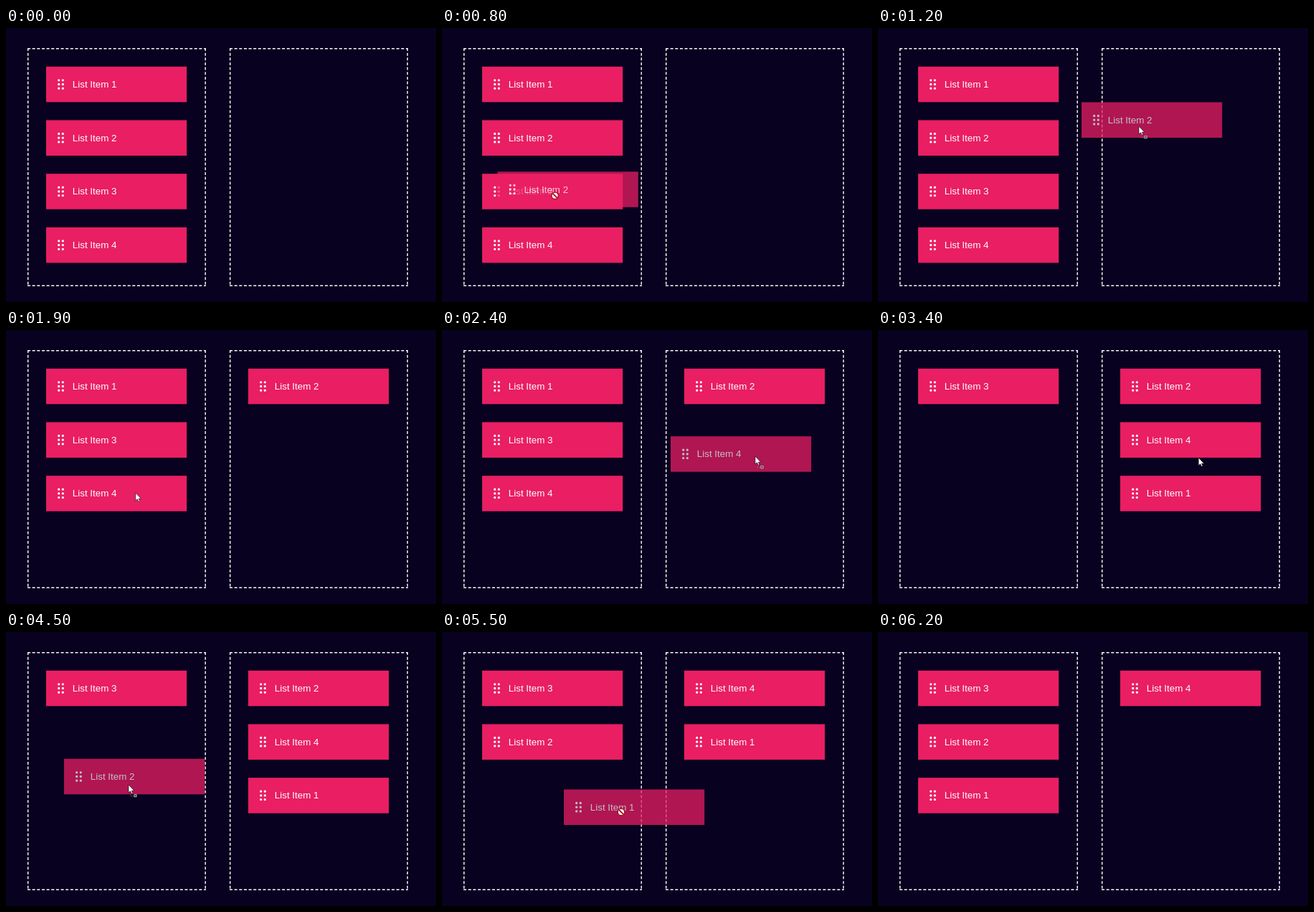
Recreate the animation shown at these times as an HTML page. Size 600 by 382 pixels, loop 6.3 s.

```html
<!DOCTYPE html>
<html lang="en">
<head>
<meta charset="utf-8">
<title>Drag and drop lists</title>
<style>
  html, body { margin: 0; width: 100%; height: 100%; overflow: hidden; background: #080120; }
  svg { display: block; width: 600px; height: 382px; }
  text { font: 13.4px "Liberation Sans", Arial, sans-serif; fill: #fff; }
  .list { fill: none; stroke: #fff; stroke-width: 1.4; stroke-dasharray: 4 2.65; }
</style>
</head>
<body>
<svg viewBox="0 0 600 382">
  <defs>
    <g id="card">
      <rect width="196.2" height="49.5" fill="#e91e63"/>
      <path d="M17.7 19h0M23.3 19h0M17.7 24.7h0M23.3 24.7h0M17.7 30.4h0M23.3 30.4h0"
            stroke="#fff" stroke-width="3.3" stroke-linecap="round"/>
    </g>
    <path id="arrow" d="M0 0V11L2.5 8.8 4.3 12.4 6 11.6 4.3 8.2H7.8Z" fill="#fff" stroke="#000" stroke-width=".6"/>
    <g id="move">
      <use href="#arrow"/>
      <path d="M3 13v3h4" fill="none" stroke="#888" stroke-width=".8" stroke-dasharray="1 1"/>
      <rect x="8" y="13.7" width="3" height="3" fill="#222" stroke="#bbb"/>
    </g>
    <g id="blocked">
      <circle r="4.8" fill="#fff" stroke="#a01828" stroke-width="1.6"/>
      <path d="M-3-3 3 3" stroke="#c01828" stroke-width="2"/>
    </g>
    <path id="frame" class="list" d="M30 28.7h249M30 359.2h249M30.7 28v332M278.2 28v332"/>
  </defs>
  <use href="#frame"/>
  <use href="#frame" x="282"/>
  <g id="scene"></g>
</svg>
<script>
const STEP = 100, STEPS = 63;
const scene = document.getElementById('scene');
const key = (step, x, y) => ({ step, x, y });
const slot = (list, row) => ({ x: 56 + 282 * list, y: 53.8 + 74.7 * row });

// Each drag picks an item up, passes the via points and lands in a free slot
const enter = key(1, 241, 78), leave = key(62, 230, 76);
const drags = [
  { item: 2, to: 1, grab: key(4, 136, 162), via: [key(7, 106, 258), key(12, 364, 137)], drop: 14 },
  { item: 4, to: 1, grab: key(20, 174, 231), via: [key(24, 437, 176)], drop: 26 },
  { item: 1, to: 1, grab: key(27, 176, 78), via: [key(30, 430, 250)], drop: 32 },
  { item: 2, to: 0, grab: key(42, 428, 90), via: [key(45, 171, 213)], drop: 47 },
  { item: 1, to: 0, grab: key(53, 418, 160), via: [key(55, 250, 251), key(56, 170, 268)], drop: 58 }
];

let lists = [[1, 2, 3, 4], []];
const path = [enter];
for (const drag of drags) {
  const { item, to, grab, via, drop } = drag;
  const home = slot(1 - to, lists[1 - to].indexOf(item));
  const end = slot(to, lists[to].length);
  drag.before = lists;
  drag.offset = { x: home.x - grab.x, y: home.y - grab.y };
  path.push({ ...grab, free: true }, ...via,
    key(drop, end.x - drag.offset.x, end.y - drag.offset.y));
  lists = lists.map((items, i) =>
    i === to ? [...items, item] : items.filter(other => other !== item));
}
path.push({ ...leave, free: true });

// The free pointer slows down as it arrives; a dragging one moves evenly
function pointer(step) {
  if (step < enter.step || step >= leave.step) return null;
  const i = path.findIndex(point => point.step > step);
  const a = path[i - 1], b = path[i];
  const t = (step - a.step) / (b.step - a.step);
  const k = b.free ? 1 - (1 - t) ** 2 : t;
  return { x: a.x + (b.x - a.x) * k, y: a.y + (b.y - a.y) * k };
}

const card = (item, { x, y }, opacity = 1) =>
  `<g transform="translate(${x} ${y})" opacity="${opacity}">
    <use href="#card"/><text x="36.8" y="29.3">List Item ${item}</text></g>`;

function render(step) {
  const next = drags.find(drag => step < drag.drop);
  let html = (next ? next.before : lists).map((items, list) =>
    items.map((item, row) => card(item, slot(list, row))).join('')).join('');

  const at = pointer(step);
  let shape = 'arrow';
  if (next && step > next.grab.step) {
    html += card(next.item, { x: at.x + next.offset.x, y: at.y + next.offset.y }, 0.75);
    shape = (next.to ? at.x > 312 : at.x < 240) ? 'move' : 'blocked';
  }
  if (at) html += `<use href="#${shape}" x="${at.x}" y="${at.y}"/>`;
  scene.innerHTML = html;
}

let shown = -1;
function tick() {
  const step = Math.floor(performance.now() / STEP) % STEPS;
  if (step !== shown) render(shown = step);
  requestAnimationFrame(tick);
}
tick();
</script>
</body>
</html>
```
